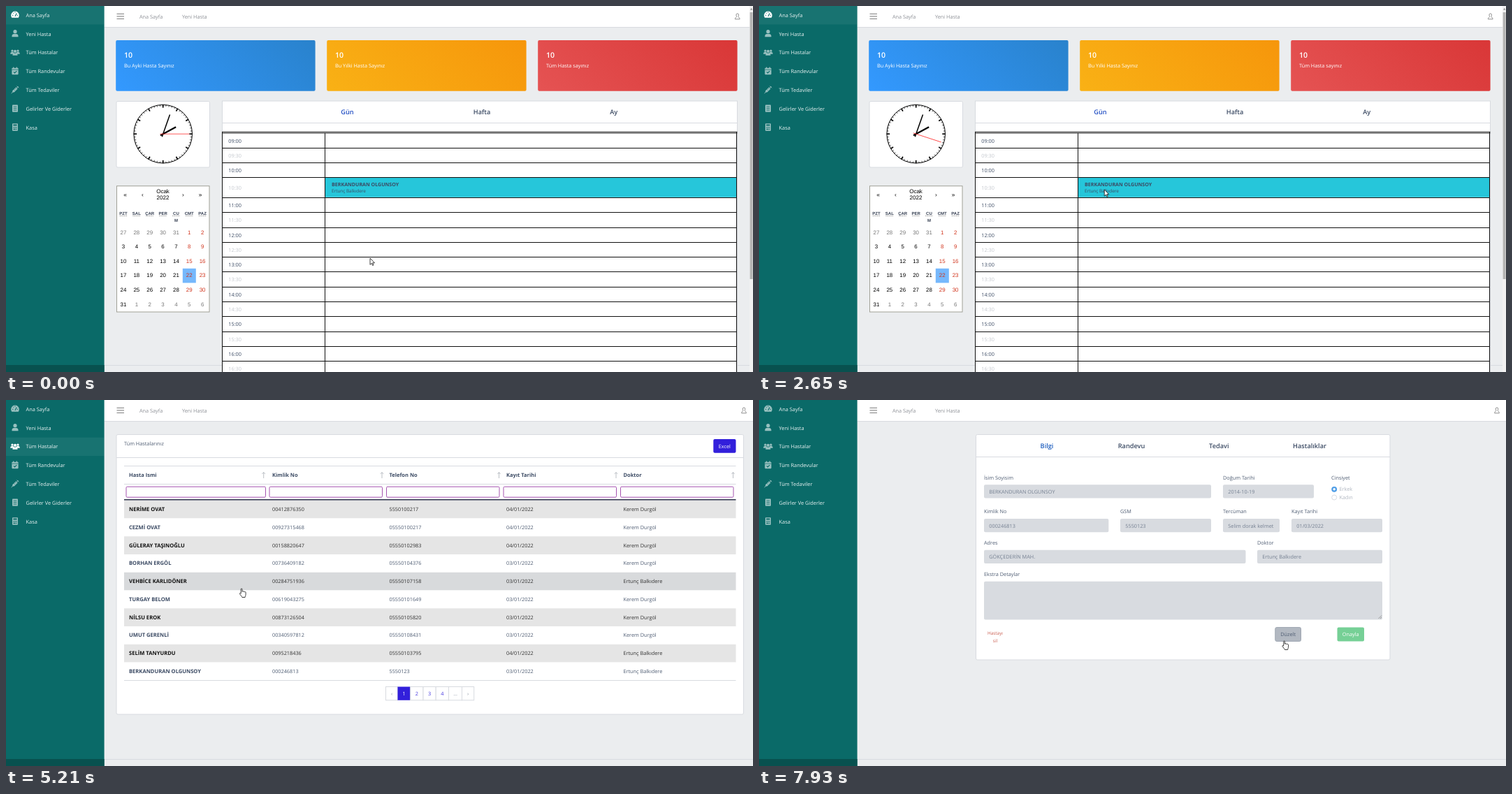
An HTML page that plays this animation: 1069x524 px, repeating every 8 s.

```html
<!DOCTYPE html>
<html lang="tr">
<head>
<meta charset="utf-8">
<title>Hasta paneli</title>
<style>
  html, body { margin: 0; width: 100%; height: 100%; overflow: hidden; }
  svg { display: block; font-family: "Open Sans", "Noto Sans", sans-serif; text-rendering: geometricPrecision; }
  .arial { font-family: "Liberation Sans", Arial, sans-serif; }
</style>
</head>
<body>
<script>
const LOOP = 8000, TEAL = '#0a6a68', BORDER = '#d8dbe0', INK = '#3c4b64', MUTED = '#4f5d73';
const MIDDLE = 'text-anchor="middle"', BOLD = 'font-weight="700"', SEMI = 'font-weight="600"';
const PATIENT = 'BERKANDURAN OLGUNSOY', DOCTORS = ['Kerem Durgöl', 'Ertunç Balkıdere'];

// Markup helpers
const rect = (x, y, w, h, fill, extra = '') =>
  `<rect x="${x}" y="${y}" width="${w}" height="${h}" fill="${fill}" ${extra}/>`;
const path = (d, extra = '') => `<path d="${d}" ${extra}/>`;
const line = (d, color, width = 1) => path(d, `fill="none" stroke="${color}" stroke-width="${width}"`);
const circle = (x, y, r, extra = '') => `<circle cx="${x}" cy="${y}" r="${r}" ${extra}/>`;
const text = (x, y, s, fill = MUTED, size = 7.3, extra = '') =>
  `<text x="${x}" y="${y}" fill="${fill}" font-size="${size}" ${extra}>${s}</text>`;
const group = (id, content, extra = '') => `<g id="${id}" ${extra}>${content}</g>`;
const card = (x, y, w, h) => rect(x, y, w, h, '#fff', `rx="2" stroke="${BORDER}"`);
const times = (n, fn) => Array.from({ length: n }, (_, i) => fn(i)).join('');

// Sidebar
const cut = (d, w = 1) => line(d, TEAL, w);
const person = (x, y, k) => `<g transform="translate(${x} ${y}) scale(${k})">` +
  circle(0, -2.6, 2.6) + path('M-4.5 5V3.6A3 3 0 0 1-1.5.7h3A3 3 0 0 1 4.5 3.6V5Z') + '</g>';
const sheet = rect(-4, -5.2, 8, 10.4, '#fff', 'rx=".8"');
const menu = [
  ['Ana Sayfa', path('M-4.7 4.4A5.8 5.8 0 1 1 4.7 4.4Z') + cut('M0 2.4L2.3-2M-3.8 1h1M-2.8-2.2h1M-.5-3.5h1M2.8 1h1', 1.1)],
  ['Yeni Hasta', person(0, 0, 1)],
  ['Tüm Hastalar', person(-4, -.4, .6) + person(4, -.4, .6) + person(0, .8, .78)],
  ['Tüm Randevular', rect(-4.6, -4.2, 9.2, 9.4, '#fff', 'rx=".8"') + path('M-3-5.5h1.3v2H-3ZM1.7-5.5H3v2H1.7Z') +
    cut('M-4.6-1.8H4.6', .7) + cut('M-2 1.4L-.5 3 2.3.2', 1.2)],
  ['Tüm Tedaviler', path('M-5.3 5.3L-2.5 2.5M2.5-2.5L4.5-4.5M2.5-5.2L5.2-2.5', 'stroke="#fff"') +
    path('M-3.6 1.4L1.4-3.6 3.6-1.4-1.4 3.6-3.6 3.6Z') + cut('M-1.6-.4l1.4 1.4M.2-2.2L1.6-.8', .7)],
  ['Gelirler Ve Giderler', sheet + cut('M-2.4-2.4h4.8M-2.4 0h4.8M-2.4 2.4h4.8', .8)],
  ['Kasa', sheet + cut('M-2.6-3h5.2', 1.9) + cut('M-2.6 .3h1.3M-.6 .3h1.3M1.4 .3h1.3M-2.6 2.9h3.3M1.4 2.9h1.3', 1.3)],
];
const sidebar = rect(0, 0, 140.6, 524, TEAL) + rect(0, 514, 140.6, 10, '#08514f') +
  menu.map(([label, icon], i) => {
    const y = 13 + i * 26.85;
    return rect(0, y - 13, 140.6, 26.4, '#fff', `id="active${i}" opacity="0"`) +
      group('icon' + i, icon, `transform="translate(13 ${y - .6})" fill="#fff"`) +
      text(28.5, y + 2.7, label, '#e9f2f2', 7.4);
  }).join('');

const header = rect(140.6, 0, 929, 30, '#fff') + line('M140.6 30.5H1069', BORDER) +
  line('M158.5 11.3H169M158.5 14.8H169M158.5 18.3H169', '#777') +
  text(191, 18, 'Ana Sayfa', '#8d9096') + text(252, 18, 'Yeni Hasta', '#8d9096') +
  group('account', line('M-1.8-2a1.8 2.2 0 1 1 3.6 0c0 1-.6 1.6-.9 2 .1.9 2.3 1 2.5 3.8h-6.8c.2-2.8 2.4-2.9 2.5-3.8-.3-.4-.9-1-.9-2Z', '#858585', .9));

// Dashboard
const stats = [['Bu Ayki Hasta Sayınız', '#39f', '#2982cc'], ['Bu Yılki Hasta Sayınız', '#f9b115', '#f6960b'],
  ['Tüm Hasta sayınız', '#e55353', '#d93737']].map(([label, from, to], i) => {
  const x = 157.2 + i * 302, cx = x + 142.7;
  return `<linearGradient id="tone${i}" gradientUnits="userSpaceOnUse" x1="${cx - 89.6}" y1="175" x2="${cx + 89.6}" y2="-4.2">` +
    `<stop stop-color="${from}"/><stop offset="1" stop-color="${to}"/></linearGradient>` +
    rect(x, 49, 285.4, 72.7, `url(#tone${i})`, 'rx="2"') +
    text(x + 11.8, 73.7, '10', '#fff', 10.6, SEMI) + text(x + 11.8, 87.5, label, '#fff');
}).join('');

const turn = (angle, content, id = '') => `<g ${id && `id="${id}"`} transform="rotate(${angle})">${content}</g>`;
const clock = card(158, 136.5, 133.5, 94.5) + '<g transform="translate(224.7 183.2)">' +
  circle(0, 0, 41.8, 'fill="#fff" stroke="#000"') +
  times(60, i => turn(i * 6, i % 5 ? line('M0-42V-39.4', '#000', .6) : line('M0-42V-37.6', '#000', 1.7))) +
  turn(61.5, line('M0 4.2V-21', '#000', 2.2)) + turn(19.5, line('M0 4.2V-29.4', '#000', 1.5)) +
  turn(0, line('M0 4.2V-37.8', '#f33', .8), 'second') + '</g>';

const column = i => 168 + i * 18.85;
const calendar = '<g class="arial" text-anchor="middle">' + rect(158.5, 257.7, 132.5, 180.3, '#fff', 'stroke="#a0a096"') +
  [['«', 170.5], ['‹', 195.5], ['›', 253.5], ['»', 278]].map(([s, x]) => text(x, 272.5, s, '#000', 8.4)).join('') +
  text(224.5, 268, 'Ocak', '#000', 8) + text(224.5, 277, '2022', '#000', 8) +
  ['PZT', 'SAL', 'ÇAR', 'PER', 'CU', 'CMT', 'PAZ'].map((s, i) => text(column(i), 299.3, s, '#333d50', 6, BOLD) +
    path(`M${column(i) - 5.5} 300.5h11`, 'stroke="#555" stroke-width=".6" stroke-dasharray="1 .6"')).join('') +
  text(column(4), 308.5, 'M', '#333d50', 6, BOLD) + rect(252.8, 375.8, 19, 20.6, '#76b8fc') +
  times(42, i => {
    const date = new Date(2021, 11, 27 + i);
    const fill = date.getMonth() ? '#777' : i % 7 > 4 ? '#d1341c' : '#000';
    return text(column(i % 7), 326.8 + Math.floor(i / 7) * 20.55, date.getDate(), fill, 7.9);
  }) + '</g>';

const booking = y => rect(457, y, 588.5, 27.8, '#26c6da') +
  text(466, y + 12, PATIENT, INK, 7.1, BOLD) + text(466, y + 21.2, DOCTORS[1], INK, 6.4);
const schedule = bookedRow => {
  let y = 182, out = '';
  for (let i = 0; i < 17; i++) {
    const height = i === bookedRow ? 28.5 : 21.3;
    const label = `${String(9 + (i >> 1)).padStart(2, '0')}:${i % 2 ? 30 : '00'}`;
    if (i === bookedRow) out += booking(Math.floor(y) + 1);
    out += text(318.3, y + height / 2 + 2.9, label, i % 2 ? '#c3c7cd' : INK);
    y += height;
    out += line(`M309 ${Math.floor(y) + .5}H1046`, '#111');
  }
  return out;
};
const planner = rect(309.5, 136, 737, 400, '#fff', `stroke="${BORDER}"`) + line('M309 167.5H1046', BORDER) +
  [['Gün', 488.5, '#2450c4'], ['Hafta', 681, INK], ['Ay', 869.7, INK]]
    .map(([s, x, fill]) => text(x, 155.3, s, fill, 9.2, `${SEMI} ${MIDDLE}`)).join('') +
  line('M309 180.3H1046.5M309 182H1046.5', '#222') +
  [['free', -1], ['early', 3], ['late', 6]].map(([id, row]) => group(id, schedule(row))).join('') +
  line('M309.5 180V524M456.5 182V524M1045.5 180V524', '#111');
const scrollbar = rect(1064, 0, 5, 524, '#f1f1f1') + rect(1064.6, 9, 4, 382, '#b4b4b4') + path('M1065 5.5l1.7-2.5 1.7 2.5Z', 'fill="#888"');
const home = stats + clock + calendar + planner + scrollbar + group('ghost', booking(246), 'opacity=".5"');

// Patient list
const patients = [
  ['NERİME OVAT', '00412876350', '5550100217', 4, 0], ['CEZMİ OVAT', '00927315468', '05550100217', 4, 0],
  ['GÜLERAY TAŞINOĞLU', '00158820647', '05550102983', 4, 0], ['BORHAN ERGÖL', '00736409182', '05550104376', 3, 0],
  ['VEHBİCE KARLIDÖNER', '00284751936', '05550107158', 3, 1], ['TURGAY BELOM', '00619043275', '05550101649', 3, 0],
  ['NİLSU EROK', '00873126504', '05550105820', 3, 0], ['UMUT GERENLİ', '00340597812', '05550108431', 3, 0],
  ['SELİM TANYURDU', '0095218436', '05550103795', 4, 1], [PATIENT, '000246813', '5550123', 3, 1]];
const columns = [['Hasta Ismi', 176, 199.5], ['Kimlik No', 381, 161.5], ['Telefon No', 548.5, 161.5],
  ['Kayıt Tarihi', 716, 161.5], ['Doktor', 883.5, 161.5]];
const ROW = 25.77, ROWS_TOP = 143.7;
const pages = [['‹', 543.5], ['1', 560.5], ['2', 578.7], ['3', 597], ['4', 615.2], ['…', 633.5], ['›', 652.5], ['', 669.7]];
const list = card(158, 49.5, 897.5, 400.5) + text(169, 65, 'Tüm Hastalarınız') + line('M158 82.5H1055.5', BORDER) +
  rect(1012.3, 56, 32.2, 19.8, '#321fdb', 'rx="2"') + text(1028.4, 68.8, 'Excel', '#fff', 7.3, MIDDLE) +
  line('M169 94.5H1044.5M169 120.5H1044.5', BORDER) +
  columns.map(([label, x, w], i) => text(x, 110.3, label, INK, 7.5, BOLD) +
    line(`M${x - 12.3 + w + (i ? 7.8 : 5.5)} 112v-8.5m-2.2 2.4l2.2-2.4 2.2 2.4`, '#b5b9c0', .9) +
    rect(x - 4, 124.2, w, 15, '#fff', 'rx="1.5" stroke="#a552b0"')).join('') +
  patients.map(([name, id, phone, day, doctor], i) => {
    const y = ROWS_TOP + i * ROW, base = y + 15.4;
    const cells = [id, phone, `0${day}/01/2022`, DOCTORS[doctor]];
    return rect(169, y, 875.5, ROW, i % 2 ? '#fff' : '#e5e5e5', `id="row${i}"`) +
      text(176, base, name, i % 2 ? INK : '#111', 7.6, BOLD) +
      cells.map((s, k) => text(columns[k + 1][1], base, s, i % 2 ? MUTED : '#333')).join('');
  }).join('') +
  line('M169 142.8H1044.5', '#2b3048', 1.6) + line('M169 401.5H1044.5', BORDER) +
  pages.slice(0, -1).map(([s, x], i) => {
    const w = pages[i + 1][1] - x, on = i === 1;
    return rect(x, 410.5, w, 19.3, on ? '#321fdb' : '#fff', on ? '' : `stroke="${BORDER}"`) +
      text(x + w / 2, 423, s, on ? '#fff' : i > 1 && i < 5 ? '#4638df' : '#8a93a2', 7.3, MIDDLE);
  }).join('');

// Patient form: label, x, y, width, blank value, loaded value
const fields = [
  ['İsim Soyisim', 322, 121.3, 325, '', PATIENT], ['Doğum Tarihi', 664, 121.3, 130, '', '2014-10-19'],
  ['Kimlik No', 322, 170, 178.3, '', '000246813'], ['GSM', 517, 170, 130, '', '5550123'],
  ['Tercüman', 664, 170, 81, 'Yok', 'Selim dorak kelmet'], ['Kayıt Tarihi', 762, 170, 130, 'mm/dd/yyyy', '01/03/2022'],
  ['Adres', 322, 214.8, 374.5, '', 'GÖKÇEDERİN MAH.'], ['Doktor', 713, 214.8, 179, ...DOCTORS],
  ['Ekstra Detaylar', 322, 259.7, 570, '', '']];
const valueTexts = k => fields.map(f => text(f[1] + 7.3, f[2] + 12.5, f[k], '#768192')).join('');
const button = (id, x, w, fill, label, color) => rect(x, 325.6, w, 19.8, fill, `id="${id}" rx="2"`) +
  text(x + w / 2, 338.4, label, color, 7.3, MIDDLE);
const radio = (y, label) => circle(823.2, y, 3.5, 'fill="#fff" stroke="#ccd1d8" stroke-width=".8"') +
  text(830.5, y + 2.5, label, '#b1b7c1');
const form = card(310.5, 49.5, 592.5, 322.5) + line('M310.5 81.5H903', BORDER) +
  [['Bilgi', 412, '#1f5fbf'], ['Randevu', 533, INK], ['Tedavi', 658.3, INK], ['Hastalıklar', 788, INK]]
    .map(([s, x, fill]) => text(x, 68.7, s, fill, 9.2, `${SEMI} ${MIDDLE}`)).join('') +
  fields.map(([label, x, y, w]) => text(x, y - 7.6, label) +
    rect(x, y, w, w > 500 ? 54.7 : 19.3, '#d8dbe0', 'rx="2"')).join('') +
  line('M886.5 313l4.5-4.5M889 313l2-2', '#888', .8) + text(819, 113.7, 'Cinsiyet') +
  radio(127.8, 'Erkek') + radio(139.5, 'Kadın') +
  group('blank', valueTexts(4)) +
  group('loaded', valueTexts(5) + circle(823.2, 127.8, 2.8, 'fill="#fff" stroke="#4f9fe8" stroke-width="2.2"')) +
  text(338, 336.3, 'Hastayı', '#c8594b', 6.4, MIDDLE) + text(338, 346.8, 'sil', '#c8594b', 6.4, MIDDLE) +
  button('edit', 738.8, 36.7, '#ced2d8', 'Düzelt', MUTED) + button('confirm', 827.5, 38.5, '#76d096', 'Onayla', '#fff');

const loader = rect(0, 0, 1069, 524, '#000', 'opacity=".4"') +
  '<g transform="translate(535 270.5)"><g id="spinner">' +
  circle(0, 0, 8.3, 'fill="none" stroke="#41609c" stroke-width="1.8" pathLength="4" stroke-dasharray="3.2 .8"') + '</g></g>';

const outline = 'fill="#fff" stroke="#111" stroke-width=".8" stroke-linejoin="round"';
const pointers = group('arrow', path('M0 0V9.4L2.2 7.3 3.7 10.5 5 9.9 3.6 6.8H6.5Z', outline)) +
  group('hand', path('M2.2 1.4c0-1.2 1.8-1.2 1.8 0v3.4c.2-.9 1.7-.8 1.8.2.3-.8 1.6-.6 1.7.4.4-.6 1.6-.3 1.6.6v2.6c0 2-.8 2.4-1 4.4H3.9C3.5 11.4 1.6 10 .6 8.2 0 7.1 1.2 6.4 2.2 7.6Z', outline + ' transform="translate(-3 -.5)"')) +
  group('grab', path('M1.6 2.6C1.2 1.4 2.6 1 3 2.2L3.4 3.6V1.2c0-1 1.5-1 1.5 0v2.2L5.4 1.6c.3-1 1.6-.6 1.4.4L6.5 4l.7-1.2c.6-.9 1.7-.2 1.3.8C7.6 6.3 8.2 8.6 6.8 11H3C2.4 9.4 1.2 8.2.2 6.8-.5 5.8.8 5 1.6 6L2.6 7Z', outline + ' transform="translate(-4 -5)"'));

document.body.innerHTML = '<svg width="1069" height="524" viewBox="0 0 1069 524">' +
  rect(0, 0, 1069, 524, '#ebedef') + line('M140 514.5H1069', BORDER) + header +
  group('home', home) + group('list', list) + group('form', form) + sidebar +
  group('loader', loader) + group('pointer', pointers) + '</svg>';

// Animation
const $ = id => document.getElementById(id);
const show = (id, on) => $(id).style.display = on ? '' : 'none';
const between = (t, a, b) => t >= a && t < b;
const ramp = (t, a, b) => Math.min(1, Math.max(0, (t - a) / (b - a)));

// time, x, y, pointer shape from then on
const track = [
  [0, 521, 361, 'arrow'], [130, 521, 361, 'arrow'], [660, 497, 268, 'grab'], [1000, 495, 262, 'grab'],
  [1560, 499, 330, 'grab'], [2130, 499, 330, 'grab'], [2450, 497, 264, 'grab'], [2620, 497, 264, 'arrow'],
  [3250, 104.8, 92, 'hand'], [3400, 104.8, 92, 'hand'], [3600, 70, 67, 'hand'], [4450, 70, 67, 'arrow'],
  [5000, 312, 165, 'hand'], [5210, 337, 270, 'hand'], [5650, 361, 383, 'hand'], [5950, 361, 383, 'arrow'],
  [6220, 361, 383, 'arrow'], [6620, 452, 98, 'arrow'], [6760, 452, 98, 'arrow'], [7510, 729, 326, 'arrow'],
  [7580, 729, 326, 'arrow'], [7720, 751.5, 345, 'hand'], [LOOP, 751.5, 345, 'hand']];

function pointerAt(t) {
  const i = track.findIndex((key, k) => k && t < key[0]);
  const [t0, x0, y0, shape] = track[i - 1], [t1, x1, y1] = track[i];
  const p = ramp(t, t0, t1), e = p * p * (3 - 2 * p);
  return { x: x0 + (x1 - x0) * e, y: y0 + (y1 - y0) * e, shape };
}

function render(t) {
  const { x, y, shape } = pointerAt(t);
  const loading = between(t, 6220, 6620);
  const onList = between(t, 4330, 5950);

  show('home', t < 3760);
  show('list', onList);
  show('form', t >= 6220);
  show('loader', loading);
  show('blank', loading);
  show('loaded', !loading);
  $('account').setAttribute('transform', `translate(${t < 3760 ? 1046.7 : 1056} 15)`);
  $('spinner').setAttribute('transform', `rotate(${-70 + (t - 6540) * .48})`);
  $('second').setAttribute('transform', `rotate(${Math.floor(15.2 + t * .0012) * 6})`);

  const gap = between(t, 1620, 1800) || between(t, 2450, 2620);
  const late = between(t, 1800, 2450);
  show('free', gap);
  show('late', late);
  show('early', !gap && !late);
  show('ghost', between(t, 1050, 1620) || between(t, 2150, 2450));
  $('ghost').setAttribute('transform', `translate(0 ${y - 262})`);

  menu.forEach((_, i) => {
    const on = i === 0 ? 1 - ramp(t, 3700, 3900) : i === 2 ? ramp(t, 3700, 3900) - ramp(t, 5950, 6200) : 0;
    $('active' + i).setAttribute('opacity', on * .06);
    $('icon' + i).setAttribute('opacity', .58 + .42 * on);
  });

  const hovered = onList && x > 169 ? Math.floor((y - ROWS_TOP) / ROW) : -1;
  patients.forEach((_, i) => $('row' + i).setAttribute('fill', i === hovered ? '#d8dadc' : i % 2 ? '#fff' : '#e5e5e5'));

  const focused = t >= 7780;
  $('edit').setAttribute('fill', focused ? '#b2b8c1' : '#ced2d8');
  $('edit').setAttribute('stroke', focused ? '#9da5b1' : 'none');

  show('pointer', !loading);
  $('pointer').setAttribute('transform', `translate(${x} ${y})`);
  for (const id of ['arrow', 'hand', 'grab']) show(id, id === shape);
}

function frame() {
  render(performance.now() % LOOP);
  requestAnimationFrame(frame);
}
frame();
</script>
</body>
</html>
```
